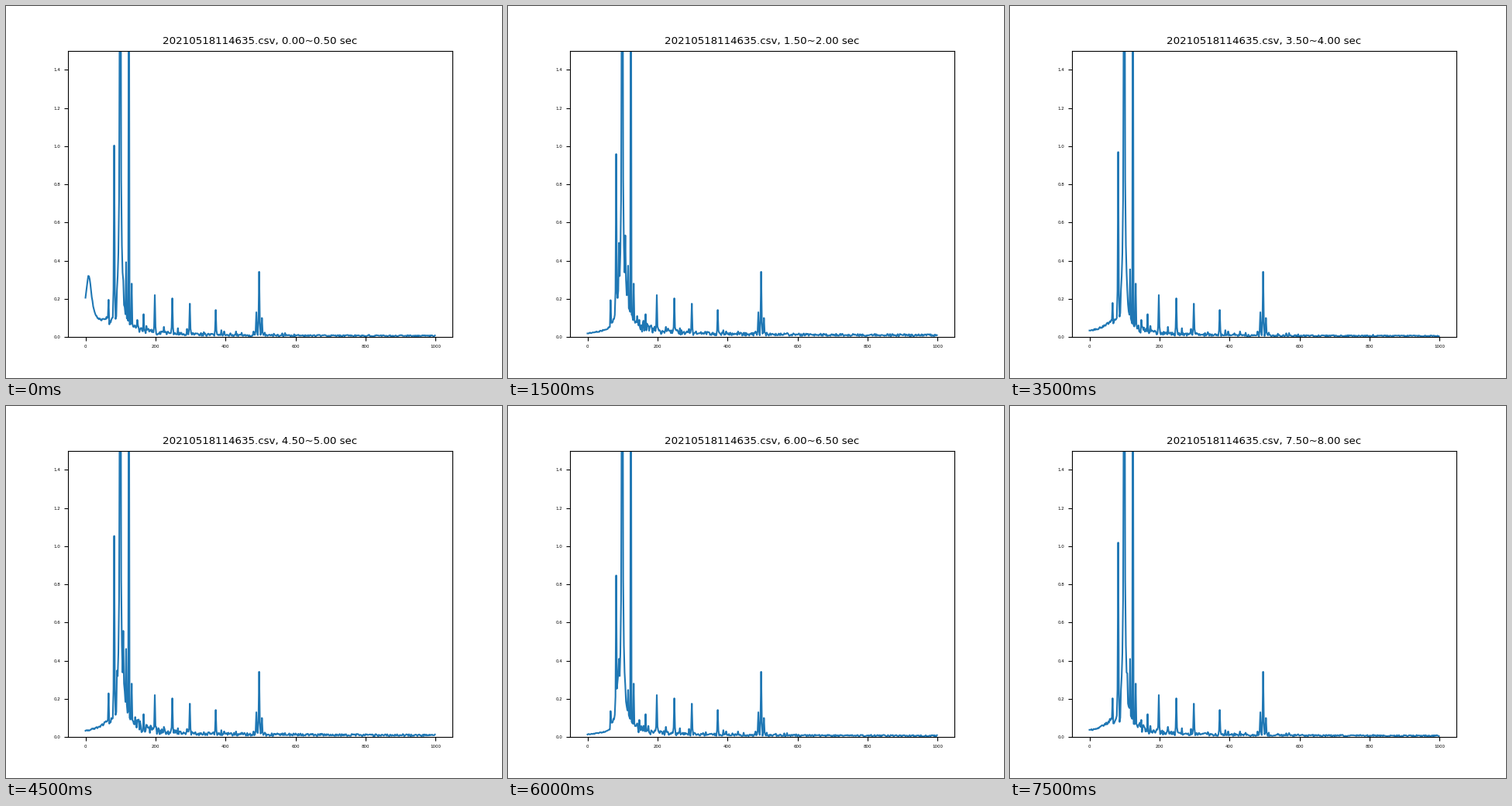
Animation, 640 px wide and 480 px high, one loop 8000 ms. Source, as a matplotlib script:

```python
import numpy as np
import matplotlib.pyplot as plt
from matplotlib.animation import FuncAnimation

FRAMES, WINDOW = 16, 0.5
freq = np.arange(0, 1000, 2)
SHAFT = 124 / 15          # every line is a multiple of this frequency
CARRIER = 12 * SHAFT      # strongest line; its leakage forms the skirt
BEAT = 7.4                # windows per beat of the leakage pattern

# Harmonic order: height, or (mean, cosine swing, sine swing) over the beat
LINES = {
    8: (.18, .035, -.035), 10: (.95, .06, -.09), 11: (.33, .12, .12),
    13: (.36, .22, -.04), 14: (.35, .075, -.085), 15: 2.5, 16: .28,
    18: .09, 20: .12, 24: .22, 30: .203, 36: .175, 45: .142,
    59: .13, 60: .342, 61: .1,
}
# Weak harmonics fade with order
weak = .1 * np.exp(-np.arange(121) / 50) * np.random.default_rng(4).random(121) ** 2


def spectrum(i):
    rng = np.random.default_rng(100 + i)
    phase = 2 * np.pi * (i - 2.4) / BEAT
    c, s = np.cos(phase), np.sin(phase)

    # Leakage skirt, bent by the beat: below, just below and above the carrier
    y = 2.3 / np.abs(freq - CARRIER)
    y[freq < 66] *= 1.1 - .5 * s
    y[(freq >= 84) & (freq <= 88)] *= 1 + .55 * s
    y[freq > 108] *= 1 + .35 * c
    y += .005 * (1 + .35 * c) * (freq > 140)
    spread = np.where(freq > 140, .55, .1)
    spread[(freq > 88) & (freq < 108)] = 0
    y *= 1 + spread * rng.uniform(-1, 1, freq.size)

    # Start-up transient in the first window
    if i == 0:
        y += .28 / (1 + ((freq - 9) / 11) ** 2) * (freq < 66)

    def add_line(order, height):
        b = round(order * SHAFT / 2)
        y[b] = max(y[b], height)
        side = .25 * min(height, 1) if order != 15 else 0
        y[b - 1:b + 2] = np.maximum(y[b - 1:b + 2], side)

    for k in range(17, 121):
        add_line(k, weak[k])
    for k, h in LINES.items():
        add_line(k, np.dot(h, (1, c, s)) if isinstance(h, tuple) else h)
    return y


plt.rcParams["font.size"] = 8
fig, ax = plt.subplots(figsize=(6.4, 4.8), dpi=100)
ax.set_ylim(0, 1.5)
ax.tick_params(labelsize=4)
line, = ax.plot(freq, spectrum(0), lw=1.5, color="#1f77b4")
title = ax.set_title("")


def update(i):
    line.set_ydata(spectrum(i))
    start = i * WINDOW
    title.set_text(f"20210518114635.csv, {start:.2f}~{start + WINDOW:.2f} sec")
    return line, title


anim = FuncAnimation(fig, update, frames=FRAMES, interval=500, repeat=True,
                     repeat_delay=0)
plt.show()
```
